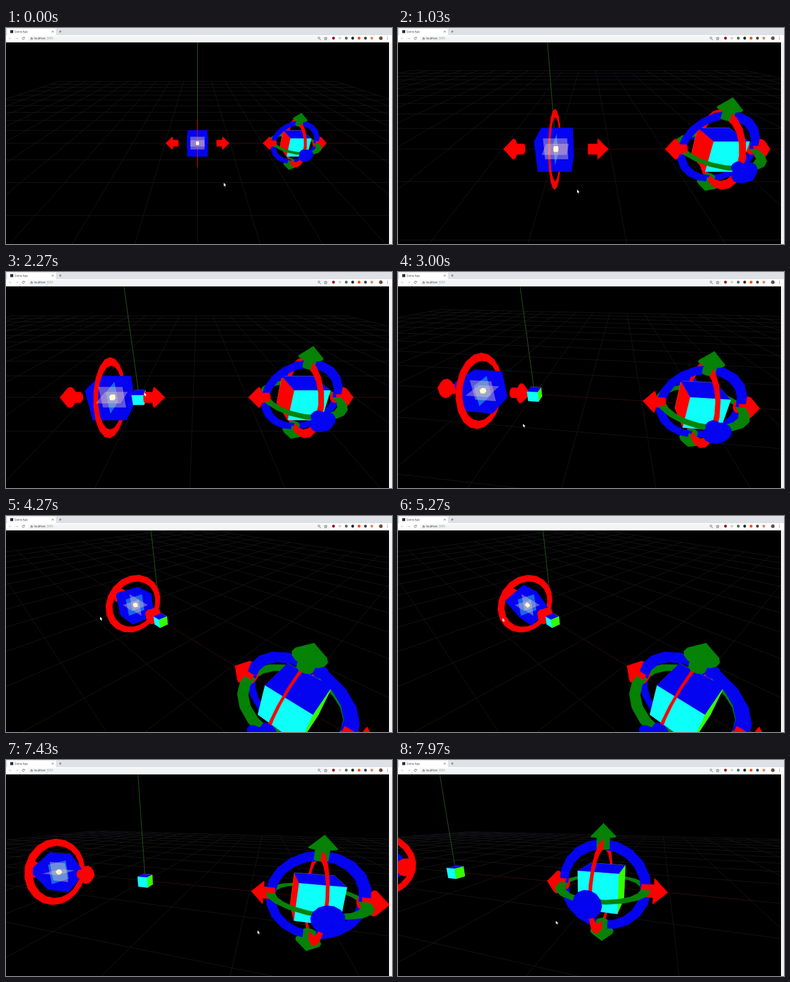
Recreate the animation shown at these times as an HTML page with a canvas. Size 640 by 360 pixels, loop 8000 ms.

```html
<!DOCTYPE html>
<html lang="en">
<head>
<meta charset="utf-8">
<title>Scene App</title>
<style>
html, body { margin: 0; width: 100%; height: 100%; overflow: hidden; background: #000; }
canvas { display: block; width: 640px; height: 360px; }
</style>
</head>
<body>
<canvas id="stage" width="640" height="360"></canvas>
<script>
const ctx = document.getElementById('stage').getContext('2d');
const LOOP = 8000, FOCAL = 360, CX = 317.5, CY = 192, RIGHT_X = 3;
const RED = '#ff0000', GREEN = '#068206', BLUE = '#0404f0', CYAN = '#0cfff8', LIME = '#30ff00';

// --- Motion: each gesture changes part of the state; the cursor follows what it drags. ---

// Angles in degrees; x, y is where the world origin appears on screen.
const initial = { azimuth: 0, pitch: 26.57, distance: 6.7, x: CX, y: CY, slide: 0, spin: 0 };

const still = (x, y) => () => [x, y];
const panFrom = (x, y) => (now, before) => [x + 1.15 * (now.x - before.x), y + 1.15 * (now.y - before.y)];
const orbitFrom = (x, y) => (now, before) => [
  x - .933 * (now.azimuth - before.azimuth), y + .933 * (now.pitch - before.pitch)];
const onArrow = now => toScreen(makeCamera(now)([now.slide + .6, .1, 0]));
const onRing = now => {
  const a = (125 - now.spin) * Math.PI / 180;
  return toScreen(makeCamera(now)([now.slide, .68 * Math.cos(a), .68 * Math.sin(a)]));
};

const gestures = [
  { start: 30, end: 650, to: { distance: 4.03 }, cursor: still(361, 258) },
  { start: 700, end: 1300, to: { x: 221, y: 209 }, cursor: panFrom(361, 258) },
  { start: 2020, end: 2540, to: { slide: -1.05 }, cursor: onArrow },
  { start: 2700, end: 3900, to: { azimuth: 46, pitch: 33.2, distance: 4.725, x: 256.5, y: 174 }, cursor: orbitFrom(214, 252) },
  { start: 4150, end: 4300, to: {}, cursor: still(156, 168) },
  { start: 4500, end: 5500, to: { spin: 30 }, cursor: onRing },
  { start: 5800, end: 6500, to: { slide: -2.19 }, cursor: onArrow },
  { start: 6750, end: 7400, to: { azimuth: 17.2, pitch: 16, distance: 4.26, x: 231, y: 201 }, cursor: orbitFrom(390, 300) },
  { start: 7430, end: 7970, to: { azimuth: 17.7, pitch: 15, distance: 4.31, x: 96, y: 187 }, cursor: panFrom(417, 284) }
];

const mix = (a, b, u) => a + (b - a) * u;
function ease(t, start, end) {
  const u = Math.min(1, Math.max(0, (t - start) / (end - start)));
  return u * u * (3 - 2 * u);
}

function stateAt(t) {
  const state = { ...initial };
  for (const { start, end, to } of gestures)
    for (const key in to) state[key] = mix(state[key], to[key], ease(t, start, end));
  return state;
}

function cursorAt(t) {
  const held = (g, time) => g.cursor(stateAt(time), stateAt(g.start));
  const next = gestures.findIndex(g => g.end >= t);
  if (next < 0) return held(gestures[gestures.length - 1], t);
  const g = gestures[next], last = gestures[next - 1];
  if (t >= g.start || !last) return held(g, t);
  const from = held(last, last.end), to = held(g, g.start), u = ease(t, last.end, g.start);
  return from.map((v, i) => mix(v, to[i], u));
}

// --- Geometry: a face is { points, color }. ---

const toAxis = [p => p, ([x, y, z]) => [z, x, y], ([x, y, z]) => [y, z, x]];
const around = (n, make) => Array.from({ length: n }, (_, i) =>
  make(i / n * Math.PI * 2, (i + 1) / n * Math.PI * 2));
const square = (axis, offset, h) =>
  [[-h, -h], [h, -h], [h, h], [-h, h]].map(([y, z]) => toAxis[axis]([offset, y, z]));

// Colors in the order +x, -x, +y, -y, +z, -z.
const box = (h, colors) => colors.map((color, i) => ({ color, points: square(i >> 1, i % 2 ? -h : h, h) }));

function ring(axis, color) {
  const at = (r, a) => toAxis[axis]([0, r * Math.cos(a), r * Math.sin(a)]);
  return around(20, (a, b) => ({ color, points: [at(.74, a), at(.74, b), at(.59, b), at(.59, a)] }));
}

function arrow(axis, sign, color) {
  const at = (x, r, a) => toAxis[axis]([sign * x, r * Math.cos(a), r * Math.sin(a)]);
  const cap = (x, r) => ({ color, points: around(14, a => at(x, r, a)) });
  const tube = (x1, r1, x2, r2) => around(14, (a, b) => ({
    color, points: [at(x1, r1, a), at(x1, r1, b), at(x2, r2, b), at(x2, r2, a)]
  }));
  return [cap(.6, .095), cap(.78, .19), ...tube(.6, .095, .78, .095), ...tube(.78, .19, .97, 0)];
}

const handle = (axis, color) => [ring(axis, color), arrow(axis, 1, color), arrow(axis, -1, color)].flat();
const cubeColors = [LIME, RED, BLUE, 'magenta', CYAN, 'yellow'];
const fullGizmo = [...box(.3, cubeColors), ...[RED, GREEN, BLUE].flatMap((c, axis) => handle(axis, c))];
const slidingGizmo = [...box(.3, Array(6).fill(BLUE)), ...handle(0, RED)];
const originCube = box(.1, cubeColors);
const planes = ['rgba(60,230,230,.42)', 'rgba(235,190,200,.4)', 'rgba(225,200,190,.42)']
  .map((color, axis) => ({ color, points: square(axis, 0, .22) }));
const centerDot = box(.035, Array(6).fill('#ffffd0'));

// --- Projection and drawing ---

function makeCamera({ azimuth, pitch, distance, x: ox, y: oy }) {
  const a = azimuth * Math.PI / 180, p = pitch * Math.PI / 180;
  const sa = Math.sin(a), ca = Math.cos(a), sp = Math.sin(p), cp = Math.cos(p);
  const x0 = (ox - CX) * distance / FOCAL, y0 = (CY - oy) * distance / FOCAL;
  return ([x, y, z]) => [
    x0 + ca * x - sa * z,
    y0 - sa * sp * x + cp * y - ca * sp * z,
    distance - sa * cp * x - sp * y - ca * cp * z
  ];
}

function toScreen([x, y, z]) {
  return [CX + FOCAL * x / z, CY - FOCAL * y / z];
}

function drawLine(camera, from, to, color) {
  const near = .1;
  let a = camera(from), b = camera(to);
  if (a[2] < b[2]) [a, b] = [b, a];
  if (a[2] < near) return;
  if (b[2] < near) {
    const u = (near - a[2]) / (b[2] - a[2]);
    b = a.map((v, i) => mix(v, b[i], u));
  }
  ctx.strokeStyle = color;
  ctx.lineWidth = .9;
  ctx.beginPath();
  ctx.moveTo(...toScreen(a));
  ctx.lineTo(...toScreen(b));
  ctx.stroke();
}

function drawFace({ view, color }, sealed) {
  ctx.beginPath();
  view.forEach(p => ctx.lineTo(...toScreen(p)));
  ctx.closePath();
  ctx.fillStyle = ctx.strokeStyle = color;
  ctx.fill();
  ctx.lineWidth = .5;
  if (sealed) ctx.stroke();
}

function drawScene(state) {
  const camera = makeCamera(state);
  const spin = state.spin * Math.PI / 180, c = Math.cos(spin), s = Math.sin(spin);
  const shift = dx => ([x, y, z]) => [x + dx, y, z];
  const spun = ([x, y, z]) => [x + state.slide, y * c - z * s, y * s + z * c];

  for (let i = -10; i <= 10; i++) {
    drawLine(camera, [i, 0, -10], [i, 0, 10], '#17171a');
    drawLine(camera, [-10, 0, i], [10, 0, i], '#17171a');
  }
  drawLine(camera, [0, 0, 0], [5, 0, 0], '#2c0800');
  drawLine(camera, [0, 0, 0], [0, 5, 0], '#28641c');

  const place = (faces, transform) => faces.map(({ points, color }) => {
    const view = points.map(p => camera(transform(p)));
    const mid = [0, 1, 2].map(i => view.reduce((sum, p) => sum + p[i], 0) / view.length);
    return { view, color, distance: Math.hypot(...mid) };
  });
  [...place(fullGizmo, shift(RIGHT_X)), ...place(slidingGizmo, spun), ...place(originCube, shift(0))]
    .sort((a, b) => b.distance - a.distance)
    .forEach(f => drawFace(f, true));
  place(planes, shift(state.slide)).forEach(f => drawFace(f, false));
  place(centerDot, spun).forEach(f => drawFace(f, true));
}

function rect(x, y, w, h, color) {
  ctx.fillStyle = color;
  ctx.fillRect(x, y, w, h);
}

function dot(x, y, r, color) {
  ctx.fillStyle = color;
  ctx.beginPath();
  ctx.arc(x, y, r, 0, Math.PI * 2);
  ctx.fill();
}

function label(text, x, y, color) {
  ctx.fillStyle = color;
  ctx.font = '4.5px "Open Sans", sans-serif';
  ctx.fillText(text, x, y);
}

function strokePath(d, color) {
  ctx.strokeStyle = color;
  ctx.lineWidth = .7;
  ctx.stroke(new Path2D(d));
}

function drawBrowser() {
  rect(0, 0, 640, 12, '#dee1e6');
  rect(2, 1, 81, 11, '#fff');
  rect(0, 12, 640, 12, '#fff');
  rect(37, 13.5, 499, 8, '#f3f4f5');
  rect(635, 24, 5, 336, '#f1f1f1');
  rect(7, 3.5, 5, 5, '#26343a');
  label('Scene App', 14, 7.7, '#444');
  strokePath('M76 4.5l3 3m0-3l-3 3M88 6h4m-2-2v4', '#555');
  strokePath('M9 17.5H5m2-2l-2 2 2 2M16 17.5h4m-2-2l2 2-2 2', '#c4c6c8');
  strokePath('M30.5 16a2 2 0 1 0 .3 2m0-3v1.5h-1.5', '#555');
  strokePath('M41 17h3v2h-3zm.6 0v-1h1.8v1', '#666');
  label('localhost', 46.5, 19, '#333');
  label(':3000', 66.5, 19, '#999');
  strokePath('M520.4 16.5a1.6 1.6 0 1 0-3.2 0a1.6 1.6 0 1 0 3.2 0M520 18l2 2', '#555');
  strokePath('M530 15l.7 1.7 1.8.1-1.4 1.2.5 1.8-1.6-1-1.6 1 .5-1.8-1.4-1.2 1.8-.1z', '#555');
  ['#a01020', '#e4d4c0', '#507058', '#25281c', '#f05010', '#444', '#e08a70']
    .forEach((color, i) => dot(543 + i * 10.6, 17, 2.4, color));
  dot(621.5, 17, 3, '#6c4c38');
  for (let y = 15; y < 20; y += 2) dot(632.5, y, .6, '#555');
}

function drawCursor(x, y) {
  ctx.save();
  ctx.translate(x, y);
  ctx.fillStyle = '#fff';
  ctx.fill(new Path2D('M0 0v5.4l1.2-1 1 2 1-.5-.9-1.9h1.7z'));
  ctx.restore();
}

function frame(now) {
  const t = now % LOOP;
  rect(0, 0, 640, 360, '#000');
  ctx.lineJoin = 'round';
  drawScene(stateAt(t));
  drawBrowser();
  drawCursor(...cursorAt(t));
  requestAnimationFrame(frame);
}
requestAnimationFrame(frame);
</script>
</body>
</html>
```
